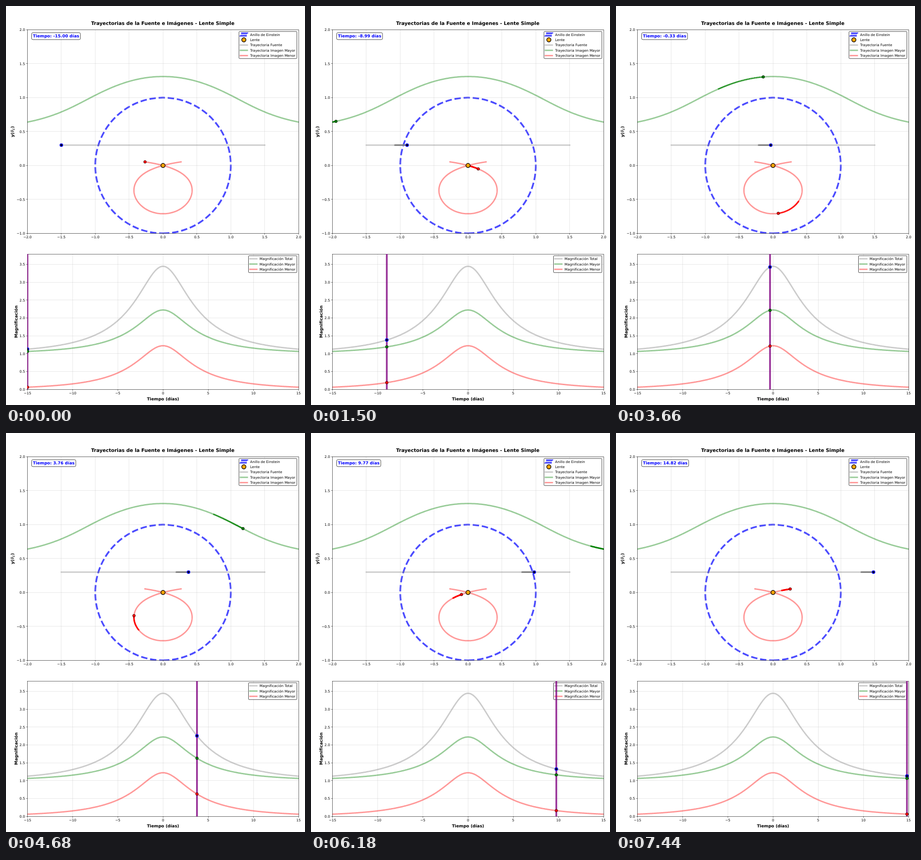
These frames come from a looping animation (648 by 864 pixels, 7500 ms). An HTML page with a canvas:

```html
<!DOCTYPE html>
<html lang="es">
<head>
<meta charset="utf-8">
<title>Lente Simple</title>
<style>
html, body { margin: 0; width: 100%; height: 100%; overflow: hidden; background: #fff; }
canvas { display: block; }
</style>
</head>
<body>
<canvas id="stage" width="648" height="864"></canvas>
<script>
const ctx = document.getElementById('stage').getContext('2d');
const FONT = '"DejaVu Sans", sans-serif';
const STEP = 60, FRAMES = 125, SAMPLES = 500, STRIDE = 4, TRAIL = 30;
const IMPACT = 0.3, T_E = 10;
const GRAY = '#808080', GREEN = '#008000', RED = '#ff0000';
const LEFT = 46.5, RIGHT = 634.1;

const plot = (x0, x1, y0, y1, top, bottom) => ({
  x0, x1, y0, y1, top, bottom,
  px: x => LEFT + (x - x0) / (x1 - x0) * (RIGHT - LEFT),
  py: y => bottom - (y - y0) / (y1 - y0) * (bottom - top)
});
const sky = plot(-2, 2, -1, 2, 51.5, 492.3);
const light = plot(-15, 15, 0, 3.789, 537, 830.3);

// Lens model: source position, both images and their magnifications
function model(i) {
  const t = -15 + 30 * i / (SAMPLES - 1), x = t / T_E;
  const u = Math.hypot(x, IMPACT), root = Math.sqrt(u * u + 4);
  const total = (u * u + 2) / (u * root);
  const image = sign => {
    const k = 1 + sign * root / (2 * u);
    return [x * k, IMPACT * k];
  };
  return {
    t, source: [x, IMPACT], major: image(1), minor: image(-1),
    magTotal: [t, total], magMajor: [t, (total + 1) / 2], magMinor: [t, (total - 1) / 2]
  };
}
const samples = Array.from({ length: SAMPLES }, (_, i) => model(i));

function text(str, x, y, { size = 7.5, bold = false, align = 'left', color = '#000', italic = false } = {}) {
  ctx.font = `${italic ? 'italic ' : ''}${bold ? 'bold ' : ''}${size}px ${FONT}`;
  ctx.textAlign = align;
  ctx.fillStyle = color;
  ctx.fillText(str, x, y);
  return ctx.measureText(str).width;
}

function line(x1, y1, x2, y2, color, width, alpha = 1, cap = 'butt') {
  ctx.save();
  ctx.globalAlpha = alpha;
  ctx.strokeStyle = color;
  ctx.lineWidth = width;
  ctx.lineCap = cap;
  ctx.beginPath();
  ctx.moveTo(x1, y1);
  ctx.lineTo(x2, y2);
  ctx.stroke();
  ctx.restore();
}

function dot(x, y, r, fill, edge, width, alpha = 1) {
  ctx.globalAlpha = alpha;
  ctx.beginPath();
  ctx.arc(x, y, r, 0, 2 * Math.PI);
  ctx.fillStyle = fill;
  ctx.fill();
  if (edge) {
    ctx.strokeStyle = edge;
    ctx.lineWidth = width;
    ctx.stroke();
  }
  ctx.globalAlpha = 1;
}

function box(x, y, w, h, r) {
  ctx.beginPath();
  ctx.roundRect(x, y, w, h, r);
  ctx.fillStyle = 'rgba(255,255,255,.8)';
  ctx.fill();
  ctx.strokeStyle = '#000';
  ctx.lineWidth = 0.75;
  ctx.stroke();
}

function clipped(p, draw) {
  ctx.save();
  ctx.beginPath();
  ctx.rect(LEFT - 0.5, p.top - 0.5, RIGHT - LEFT + 1, p.bottom - p.top + 1);
  ctx.clip();
  draw();
  ctx.restore();
}

function curve(p, key, color) {
  ctx.save();
  ctx.globalAlpha = 0.4;
  ctx.strokeStyle = color;
  ctx.lineWidth = 3;
  ctx.lineCap = 'square';
  ctx.lineJoin = 'round';
  ctx.beginPath();
  for (const s of samples) ctx.lineTo(p.px(s[key][0]), p.py(s[key][1]));
  ctx.stroke();
  ctx.restore();
}

const snap = v => Math.floor(v) + 0.5;
const label = (v, digits) => v.toFixed(digits).replace('-', '\u2212');

function ticks(p, xStep, digits, grid) {
  for (let x = p.x0; x <= p.x1; x += xStep) {
    const px = snap(p.px(x));
    if (grid) line(px, p.top, px, p.bottom, '#b0b0b0', 0.6, 0.5);
    else {
      line(px, p.bottom, px, p.bottom + 2.7, '#000', 0.6);
      text(label(x, digits), p.px(x), p.bottom + 10.9, { align: 'center' });
    }
  }
  for (let y = p.y0; y <= p.y1; y += 0.5) {
    const py = snap(p.py(y));
    if (grid) line(LEFT, py, RIGHT, py, '#b0b0b0', 0.6, 0.5);
    else {
      line(LEFT - 2.7, py, LEFT, py, '#000', 0.6);
      text(label(y, 1), LEFT - 5.3, p.py(y) + 2.8, { align: 'right' });
    }
  }
}

function spines(p) {
  const top = snap(p.top), bottom = snap(p.bottom);
  ctx.strokeStyle = '#000';
  ctx.lineWidth = 0.6;
  ctx.strokeRect(LEFT, top, snap(RIGHT) - LEFT, bottom - top);
}

function dashed(path) {
  ctx.save();
  ctx.globalAlpha = 0.7;
  ctx.strokeStyle = '#00f';
  ctx.lineWidth = 3.75;
  ctx.setLineDash([3.7 * 3.75, 1.6 * 3.75]);
  ctx.beginPath();
  path();
  ctx.stroke();
  ctx.restore();
}

const lens = (x, y) => dot(x, y, 4.5, '#ffa500', '#000', 1.5);

function legendLine(x, y, str, color) {
  line(x, y, x + 15, y, color, 3, 0.4, 'square');
  text(str, x + 21, y + 2.7);
}

function legends() {
  const x = 508, row = i => 61.8 + 11.4 * i;
  box(504.9, 55.2, 125.5, 58.6, 1.5);
  dashed(() => {
    const lo = row(0) + 2.6, hi = row(0) - 2.65;
    ctx.moveTo(x, lo);
    ctx.lineTo(x + 15, lo);
    ctx.lineTo(x + 15, hi);
    ctx.lineTo(x, hi);
    ctx.closePath();
  });
  text('Anillo de Einstein', x + 21, row(0) + 2.7);
  lens(x + 7.5, row(1));
  text('Lente', x + 21, row(1) + 2.7);
  legendLine(x, row(2), 'Trayectoria Fuente', GRAY);
  legendLine(x, row(3), 'Trayectoria Imagen Mayor', GREEN);
  legendLine(x, row(4), 'Trayectoria Imagen Menor', RED);

  box(525.5, 540.8, 104.9, 36.4, 1.5);
  ['Total', 'Mayor', 'Menor'].forEach((name, i) =>
    legendLine(528.6, 547.4 + 11.4 * i, 'Magnificación ' + name, [GRAY, GREEN, RED][i]));
}

function vertical(x, y, draw) {
  ctx.save();
  ctx.translate(x, y);
  ctx.rotate(-Math.PI / 2);
  draw();
  ctx.restore();
}

function titles() {
  const bold = { size: 9, bold: true }, center = (LEFT + RIGHT) / 2;
  text('Trayectorias de la Fuente e Imágenes - Lente Simple', center - 0.5, 40.6,
    { size: 10.5, bold: true, align: 'center' });
  text('Tiempo (días)', center, 853.6, { ...bold, align: 'center' });
  vertical(24.6, 683.6, () => text('Magnificación', 0, 0, { ...bold, align: 'center' }));
  vertical(17, 284, () => {
    let x = text('y(', 0, 0, bold);
    x += text('θ', x, 0, { size: 9, italic: true });
    x += text('E', x, 1.5, { size: 6.3, italic: true });
    text(')', x + 0.4, 0, bold);
  });
}

function marker(p, [x, y], fill, edge = '#000', width = 0.75) {
  dot(p.px(x), p.py(y), 3, fill, edge, width);
}

function timeBox(t) {
  const str = `Tiempo: ${t.toFixed(2)} días`;
  ctx.font = `bold 9px ${FONT}`;
  box(55.5, 57.8, ctx.measureText(str).width + 5.4, 15, 2.7);
  text(str, 58.2, 68.1, { size: 9, bold: true, color: '#00f' });
}

function draw(frame) {
  const i = frame * STRIDE, now = samples[i];
  ctx.fillStyle = '#fff';
  ctx.fillRect(0, 0, 648, 864);
  ctx.textRendering = 'geometricPrecision';
  const cx = sky.px(0), cy = sky.py(0);

  clipped(sky, () => {
    dashed(() => ctx.arc(cx, cy, sky.px(1) - cx, Math.PI / 2, -1.5 * Math.PI, true));
    ticks(sky, 0.5, 1, true);
    curve(sky, 'source', GRAY);
    curve(sky, 'major', GREEN);
    curve(sky, 'minor', RED);
    for (const [key, color] of [['source', GRAY], ['major', GREEN], ['minor', RED]])
      for (const s of samples.slice(Math.max(0, i - TRAIL), i))
        dot(sky.px(s[key][0]), sky.py(s[key][1]), 1.75, color, null, 0, 0.7);
  });
  clipped(light, () => {
    ticks(light, 5, 0, true);
    curve(light, 'magTotal', GRAY);
    curve(light, 'magMajor', GREEN);
    curve(light, 'magMinor', RED);
  });

  ticks(sky, 0.5, 1, false);
  ticks(light, 5, 0, false);
  spines(sky);
  spines(light);
  titles();
  legends();
  timeBox(now.t);

  clipped(sky, () => {
    lens(cx, cy);
    marker(sky, now.source, '#000', '#00f', 1.5);
    marker(sky, now.major, GREEN);
    marker(sky, now.minor, RED);
  });
  clipped(light, () => {
    const x = light.px(now.t);
    line(x, light.top, x, light.bottom, '#800080', 3.75, 0.8);
    marker(light, now.magTotal, '#000', '#00f', 1.5);
    marker(light, now.magMajor, GREEN);
    marker(light, now.magMinor, RED);
  });
}

function tick() {
  draw(Math.floor(performance.now() / STEP) % FRAMES);
  requestAnimationFrame(tick);
}
tick();
</script>
</body>
</html>
```
